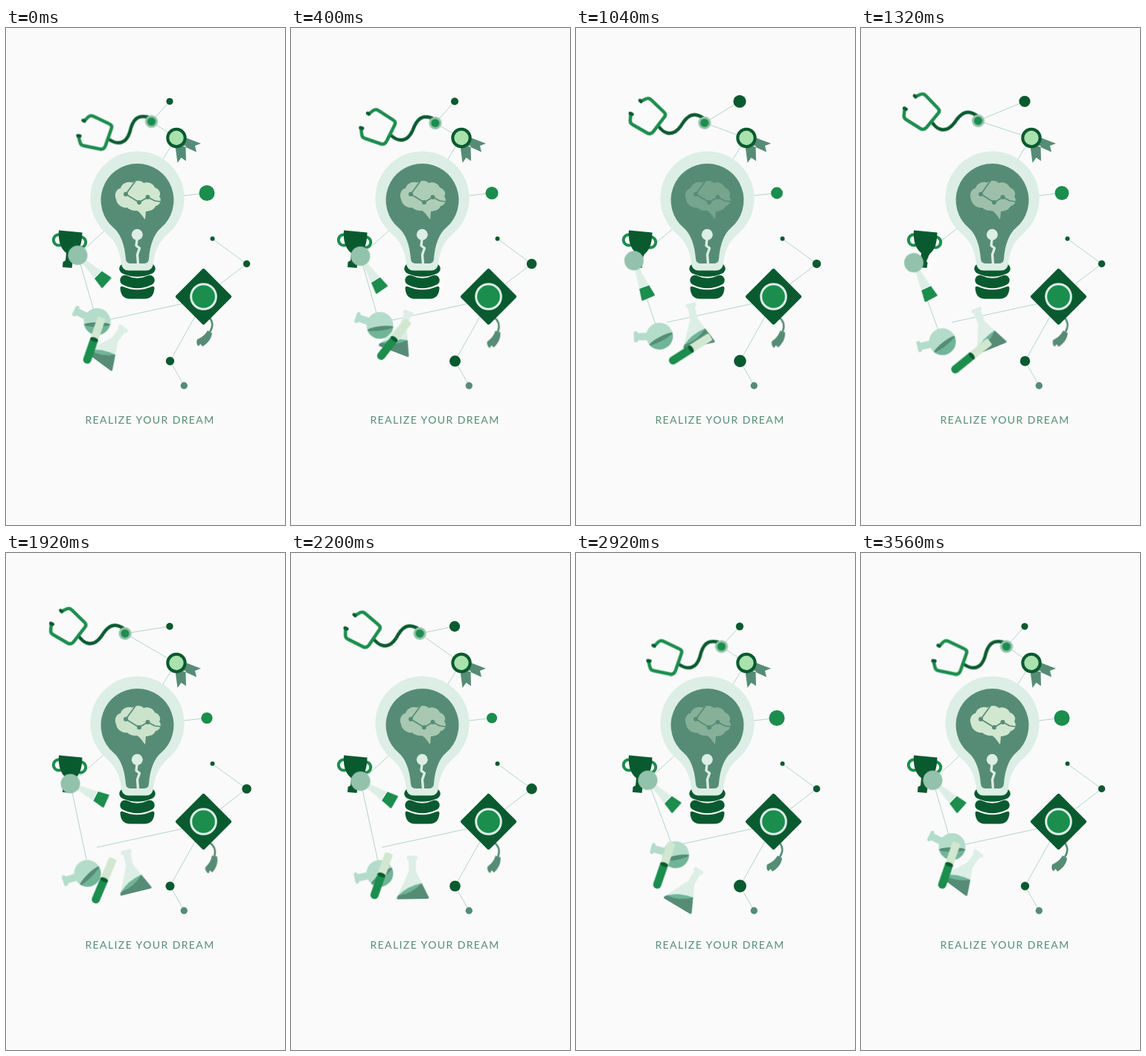
Animation of 375x667 px, one loop 3.76 s. Source, as an HTML page without scripts:

```html
<!DOCTYPE html>
<html lang="en">
<head>
<meta charset="utf-8">
<title>Realize your dream</title>
<style>
  :root {
    --bg: #fafafa; --dark: #0a5a30; --green: #1b8d4d; --moss: #568c76;
    --sage: #93c2ac; --mint: #b3dccb; --pale: #dceee6; --cream: #d2e7d0; --liquid: #70b598;
  }
  html, body { margin: 0; width: 100%; height: 100%; overflow: hidden; background: var(--bg); }
  svg { display: block; width: 375px; height: 667px; }
  .dark { fill: var(--dark); }
  .green { fill: var(--green); }
  .moss { fill: var(--moss); }
  .sage { fill: var(--sage); }
  .mint { fill: var(--mint); }
  .pale { fill: var(--pale); }
  .cream { fill: var(--cream); }
  .liquid { fill: var(--liquid); }
  .stroke { fill: none; stroke-width: 4.5; stroke-linecap: round; stroke-linejoin: round; }
  .links { fill: none; stroke: #b4d5c7; stroke-width: 1; }
  text { font: 14px Lato, "Open Sans", sans-serif; letter-spacing: 1.4px; fill: var(--moss); }

  .move { animation: 3760ms linear infinite; }
  .pulse { animation: 3760ms ease-in-out infinite; }
  .scope { animation-name: scope; }
  .scope-link { animation-name: scope-link; }
  .brush { animation-name: brush; }
  .brush-link { animation-name: brush-link; }
  .round-flask { animation-name: round-flask; }
  .cone-flask { animation-name: cone-flask; }
  .tube { animation-name: tube; }
  .tassel { animation-name: tassel; transform-origin: 274px 389px; }
  .brain { animation-name: brain; }
  .dot-top { animation-name: dot-top; }
  .dot-side { animation-name: dot-side; }
  .dot-right { animation-name: dot-right; }
  .dot-low { animation-name: dot-low; }

  @keyframes scope {
    0%, 77.66%, 100% { transform: translate(195.5px, 125.5px) rotate(0deg); }
    9.57% { transform: translate(194.5px, 127.5px) rotate(6.5deg); }
    19.15% { transform: translate(189.5px, 128px) rotate(13.6deg); }
    27.13% { transform: translate(174px, 127.5px) rotate(18deg); }
    35.11% { transform: translate(157.5px, 124.5px) rotate(20.5deg); }
    43.09% { transform: translate(153.5px, 111.5px) rotate(20.5deg); }
    47.07% { transform: translate(155.5px, 107.5px) rotate(19.9deg); }
    51.06% { transform: translate(160px, 108px) rotate(18.7deg); }
    59.04% { transform: translate(174px, 108px) rotate(14.8deg); }
    67.02% { transform: translate(194px, 117.5px) rotate(8.4deg); }
    72.34% { transform: translate(196px, 123px) rotate(3deg); }
  }
  @keyframes scope-link {
    0%, 77.66%, 100% { d: path("M220 98.5L195.5 125.5L229 148"); }
    9.57% { d: path("M220 98.5L194.5 127.5L229 148"); }
    19.15% { d: path("M220 98.5L189.5 128L229 148"); }
    27.13% { d: path("M220 98.5L174 127.5L229 148"); }
    35.11% { d: path("M220 98.5L157.5 124.5L229 148"); }
    43.09% { d: path("M220 98.5L153.5 111.5L229 148"); }
    47.07% { d: path("M220 98.5L155.5 107.5L229 148"); }
    51.06% { d: path("M220 98.5L160 108L229 148"); }
    59.04% { d: path("M220 98.5L174 108L229 148"); }
    67.02% { d: path("M220 98.5L194 117.5L229 148"); }
    72.34% { d: path("M220 98.5L196 123L229 148"); }
  }
  @keyframes brush {
    0%, 67.02%, 100% { transform: translate(96.5px, 305px) rotate(44.5deg); }
    9.57% { transform: translate(94px, 306px) rotate(57deg); }
    19.15% { transform: translate(88px, 308px) rotate(67deg); }
    27.13% { transform: translate(78.5px, 312px) rotate(70deg); }
    35.11% { transform: translate(71px, 315px) rotate(65deg); }
    43.09% { transform: translate(76px, 313px) rotate(46deg); }
    51.06% { transform: translate(86.5px, 309.5px) rotate(27deg); }
    59.04% { transform: translate(94px, 306px) rotate(33deg); }
  }
  @keyframes brush-link {
    0%, 94.68%, 100% { d: path("M176 232L96.5 305L122.5 394"); }
    9.57% { d: path("M176 232L94 306L120 398.5"); }
    19.15% { d: path("M176 232L88 308L116 404.5"); }
    27.13% { d: path("M176 232L78.5 312L112.5 413"); }
    35.11% { d: path("M176 232L71 315L109.5 421"); }
    43.09% { d: path("M176 232L76 313L109.5 427.5"); }
    51.06% { d: path("M176 232L86.5 309.5L112 430"); }
    59.04% { d: path("M176 232L94 306L121 430"); }
    67.02% { d: path("M176 232L96.5 305L131.5 425"); }
    72.34% { d: path("M176 232L96.5 305L134.5 415.5"); }
    77.66% { d: path("M176 232L96.5 305L134 405"); }
    86.17% { d: path("M176 232L96.5 305L128.5 398"); }
  }
  @keyframes round-flask {
    0%, 94.68%, 100% { transform: translate(122.5px, 394px) rotate(0deg); }
    9.57% { transform: translate(120px, 398.5px) rotate(-6deg); }
    19.15% { transform: translate(116px, 404.5px) rotate(-15deg); }
    27.13% { transform: translate(112.5px, 413px) rotate(-27deg); }
    35.11% { transform: translate(109.5px, 421px) rotate(-38deg); }
    43.09% { transform: translate(107.5px, 427.5px) rotate(-43deg); }
    51.06% { transform: translate(109.5px, 430px) rotate(-44deg); }
    59.04% { transform: translate(120px, 430px) rotate(-37deg); }
    67.02% { transform: translate(131.5px, 425px) rotate(-26deg); }
    72.34% { transform: translate(134.5px, 415.5px) rotate(-18deg); }
    77.66% { transform: translate(134px, 405px) rotate(-11deg); }
    86.17% { transform: translate(128.5px, 398px) rotate(-5deg); }
  }
  @keyframes cone-flask {
    0%, 94.68%, 100% { transform: translate(124.5px, 448px) rotate(36.5deg); }
    9.57% { transform: translate(136px, 435px) rotate(23deg); }
    19.15% { transform: translate(150px, 427px) rotate(7deg); }
    27.13% { transform: translate(165px, 426px) rotate(-11deg); }
    35.11% { transform: translate(176px, 430px) rotate(-22deg); }
    43.09% { transform: translate(179px, 443px) rotate(-21deg); }
    51.06% { transform: translate(175px, 455px) rotate(-14deg); }
    59.04% { transform: translate(163px, 465px) rotate(0deg); }
    67.02% { transform: translate(149px, 471px) rotate(15deg); }
    77.66% { transform: translate(136px, 474px) rotate(31deg); }
  }
  @keyframes tube {
    0%, 77.66%, 100% { transform: translate(118.5px, 418px) rotate(19deg); }
    9.57% { transform: translate(137px, 417px) rotate(36deg); }
    19.15% { transform: translate(153.5px, 420px) rotate(53deg); }
    27.13% { transform: translate(155px, 430px) rotate(58deg); }
    35.11% { transform: translate(149px, 440px) rotate(51deg); }
    43.09% { transform: translate(141px, 442px) rotate(37deg); }
    51.06% { transform: translate(132px, 438.5px) rotate(23deg); }
    59.04% { transform: translate(121px, 431.5px) rotate(19deg); }
    67.02% { transform: translate(115px, 424.5px) rotate(19deg); }
  }
  @keyframes tassel {
    0%, 67%, 100% { transform: rotate(0deg); }
    18.6%, 52.7% { transform: rotate(-20deg); }
    37.2% { transform: rotate(-2deg); }
  }
  @keyframes brain {
    0%, 46.5%, 89.4%, 100% { opacity: 1; }
    25%, 72.3% { opacity: .24; }
  }
  @keyframes dot-top {
    0%, 5.3%, 48.9%, 81.9%, 100% { r: 4.6px; }
    27.7%, 65.4% { r: 8.6px; }
  }
  @keyframes dot-side {
    0%, 77%, 100% { r: 10.5px; }
    20%, 57.5% { r: 7px; }
    38.6% { r: 9.6px; }
  }
  @keyframes dot-right {
    0%, 37.2%, 78.7%, 100% { r: 4.7px; }
    15.4%, 61.7% { r: 7.3px; }
  }
  @keyframes dot-low {
    0%, 45%, 94.7%, 100% { r: 5.7px; }
    20%, 71.8% { r: 8.9px; }
  }
</style>
</head>
<body>
<svg viewBox="0 0 375 667">
  <g class="links">
    <path d="M229 147L176 232L270 221.5M277.5 283L323.5 316.5L265 361M267 364L220.5 447L239.5 480M265 364L122 395"/>
    <path class="move scope-link" d="M220 98.5L195.5 125.5L229 148"/>
    <path class="move brush-link" d="M176 232L96.5 305L122.5 394"/>
  </g>

  <circle class="dark pulse dot-top" cx="220" cy="98.5" r="4.6"/>
  <circle class="green pulse dot-side" cx="270" cy="221.5" r="10.5"/>
  <circle class="dark" cx="277.5" cy="282.8" r="3"/>
  <circle class="dark pulse dot-right" cx="323.5" cy="316.5" r="4.7"/>
  <circle class="dark pulse dot-low" cx="220.5" cy="447" r="5.7"/>
  <circle class="moss" cx="239.3" cy="480" r="4.7"/>

  <!-- medal -->
  <path class="moss" d="M241 147L262 155L254 158L256 166.500L235 157ZM227.500 158L230.500 181L235.500 174L242 178.500L241.500 158Z"/>
  <circle cx="229" cy="147.5" r="11.7" fill="#a9e2ac" stroke="#0a5a30" stroke-width="4"/>

  <!-- stethoscope -->
  <g class="move scope">
    <g class="stroke">
      <path stroke="#0a5a30" d="M-57 24C-45 32-34 30-29 14C-25-4-18-9-5-6"/>
      <path stroke="#1b8d4d" d="M-90-1L-85-6Q-82-9-78-7L-57 3Q-52 5-54 10L-62 33Q-64 38-69 37L-91 32.500Q-95 32-96 28L-98 20"/>
      <path stroke="#0a5a30" d="M-92-1.500L-90-.5M-99 19L-96 19.500"/>
    </g>
    <circle class="sage" r="8.6"/>
    <circle class="green" r="5.6"/>
  </g>

  <!-- bulb -->
  <path class="stroke" stroke="#0a5a30" style="stroke-width:13.500" d="M159 323Q176.500 331 194 323M160 338.500Q176.500 346.500 193 338.500"/>
  <path class="dark" d="M153.500 349Q153.500 346 157 347Q176.500 355.500 196 347Q199.500 346 199.500 349C199 358 195 363.500 186 363.500H167C158 363.500 154 358 153.500 349Z"/>
  <path class="pale" d="M176.500 165.500A63 63 0 0 1 218 276C206 286 200 298 198 316Q197 325.500 188 325.500H165Q156 325.500 155 316C153 298 147 286 135 276A63 63 0 0 1 176.500 165.500Z"/>
  <path class="moss" d="M176.500 182A49 49 0 0 1 208 268.500C199.500 275.500 193.500 290 192 310Q191.500 316 185 316H168Q161.500 316 161 310C159.500 290 153.500 275.500 145 268.500A49 49 0 0 1 176.500 182Z"/>
  <circle class="pale" cx="176.300" cy="277.300" r="7.500"/>
  <path class="stroke" stroke="#dceee6" style="stroke-width:3.300" d="M176 284L175 292L179.500 295.500L176.500 304L177.500 317"/>
  <path class="cream pulse brain" d="M148 230C145 224 148 216 154 215C156 208 164 205 170 207.500C174 204 182 204 185 208C191 206 198 209 200 214C206 216 209 222 206 226C210 231 207 238 201 239C199 244 193 246 188 246L187 257C183 252 180 247 176 245C170 246 165 243 163 241C156 242 149 237 148 230Z"/>
  <path class="stroke" stroke="#568c76" style="stroke-width:1.700" d="M173.500 206L161 223L179 234L190.500 227L200 232L208 233"/>
  <g class="moss">
    <circle cx="161" cy="223" r="3"/>
    <circle cx="179" cy="234" r="3"/>
    <circle cx="190.500" cy="227" r="3"/>
  </g>

  <!-- trophy -->
  <g fill="none" stroke="#1b8d4d" stroke-width="4">
    <circle cx="71" cy="284.500" r="7.200"/>
    <circle cx="100" cy="287.500" r="7.200"/>
  </g>
  <path class="dark" d="M71 271.500L102.500 274.500C102 290 99 298 92 303.500L88 313L89.500 315L88.500 322L76 321L76.500 314L80 312L81 302C73 296 70 285 71 271.500Z"/>

  <!-- brush -->
  <g class="move brush">
    <path class="pale" d="M11-3L37-7V6.500L11 3Z"/>
    <path class="green" d="M38-7.500L52.500-10.300Q53.500-10.500 53.600-9.500L54.500 7.500Q54.500 9 53 8.700L38 6.500Z"/>
    <circle class="sage" r="13"/>
  </g>

  <!-- graduation cap -->
  <g class="pulse tassel">
    <path fill="none" stroke="#568c76" stroke-width="2.500" d="M273 388Q281 397 274 408"/>
    <path class="moss" d="M271 406L277 409.500C276 418 270 424 264 427.500L261.500 424L258.500 427Q255 424 257 418C264 415 268 411 271 406Z"/>
  </g>
  <path class="dark" stroke="#0a5a30" stroke-width="5" stroke-linejoin="round" d="M265.500 325.500L300.500 360.500L265.500 395.500L230.500 360.500Z"/>
  <circle class="green" cx="265.500" cy="360.500" r="16.800" stroke="#dceee6" stroke-width="3"/>

  <!-- lab glass -->
  <g class="move round-flask">
    <g class="mint">
      <g transform="rotate(26.200)">
        <path d="M-32-5H0V5H-32Z"/>
        <rect x="-34.500" y="-7.500" width="5" height="15" rx="2"/>
      </g>
      <circle r="18"/>
    </g>
    <path class="liquid" d="M-17.500 4H17.500A18 18 0 0 1-17.500 4Z"/>
    <ellipse class="moss" cy="4" rx="17.500" ry="3"/>
  </g>
  <g class="move cone-flask">
    <g class="pale">
      <path d="M-4.800-55V-37L-21.300-2.500Q-22 0-20 0H20Q22 0 21.300-2.500L4.800-37V-55Z"/>
      <rect x="-7.200" y="-58" width="14.400" height="5.500" rx="2"/>
    </g>
    <path class="moss" d="M-19.800-5L-21.300-2.500Q-22 0-20 0H20Q22 0 21.300-2.500L12.400-21Z"/>
    <path class="liquid" d="M-19.800-5Q-6-18 12.400-21Q-1-7-19.800-5Z"/>
  </g>
  <g class="move tube">
    <path class="cream" d="M-5.500 0V-29Q-5.500-31-3.500-31H3.500Q5.500-31 5.500-29V0Z"/>
    <path class="green" d="M-5.500 0V28.500A5.500 5.500 0 0 0 5.500 28.500V0Z"/>
    <ellipse class="dark" rx="5.500" ry="2.800"/>
  </g>

  <text x="193.500" y="531" text-anchor="middle">REALIZE YOUR DREAM</text>
</svg>
</body>
</html>
```
